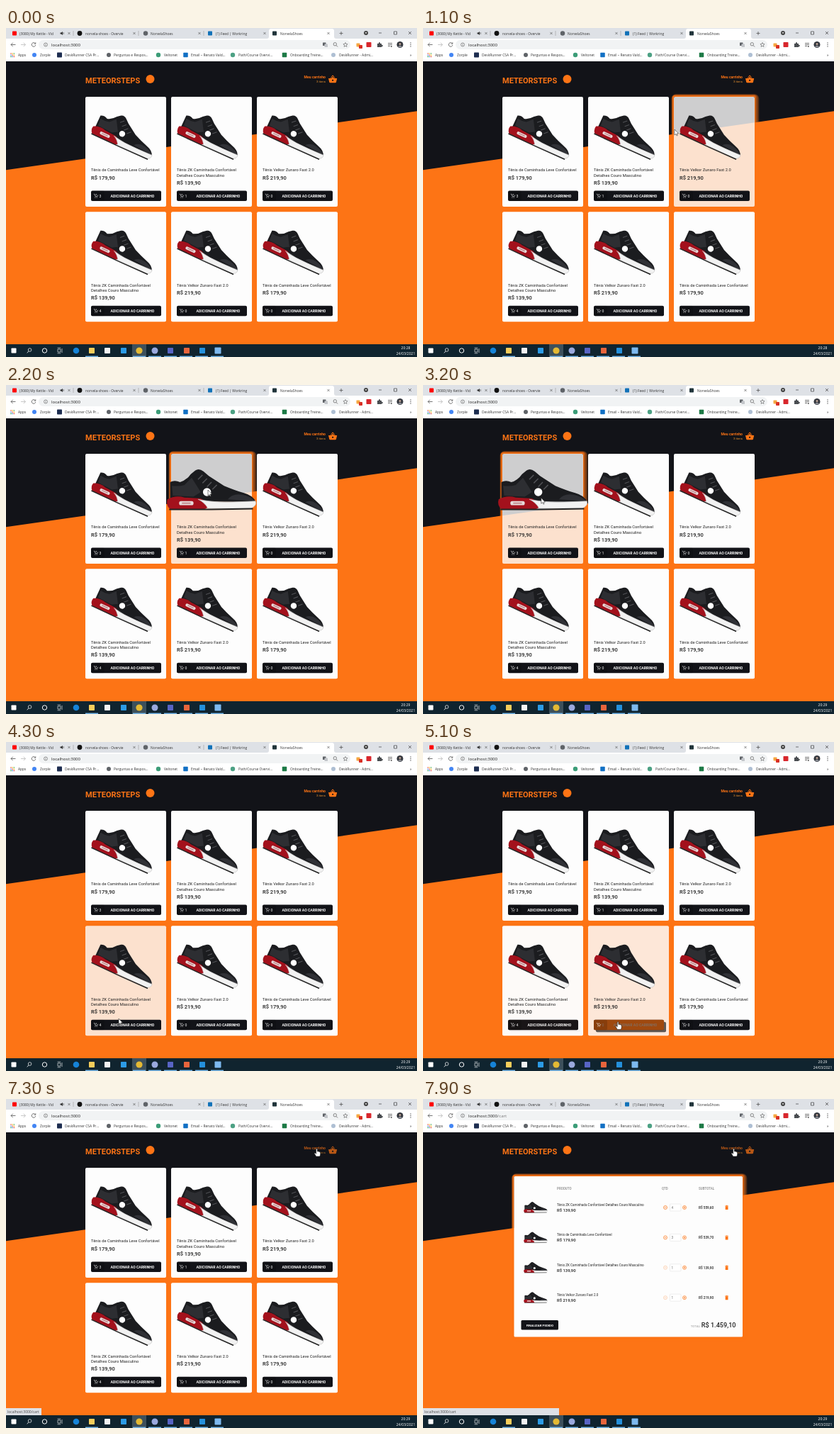
These frames come from a looping animation (580x464 px, 8000 ms). An HTML page:

```html
<!DOCTYPE html>
<html lang="pt-BR">
<head>
<meta charset="utf-8">
<title>NorvelaShoes</title>
<style>
  html, body { margin: 0; width: 100%; height: 100%; overflow: hidden; background: #fd7415; }
  svg { display: block; width: 580px; height: 464px; }
  text { font-family: Roboto, sans-serif; white-space: pre; }
  .ui text { font-family: "Open Sans", "Noto Sans", sans-serif; }
  .b { font-weight: 700; }
  .m { font-weight: 500; }
</style>
</head>
<body>
<svg id="stage" viewBox="0 0 580 464" xmlns="http://www.w3.org/2000/svg"></svg>
<script>
const LOOP = 8000, ADDED = 5500, OPENED = 7600, MINUTE = 1650;
const ORANGE = '#fd7415', INK = '#121318';

// Drawing helpers
const rect = (x, y, w, h, fill, r = 0, more = '') =>
  `<rect x="${x}" y="${y}" width="${w}" height="${h}" rx="${r}" fill="${fill}" ${more}/>`;
const dot = (x, y, r, fill, more = '') => `<circle cx="${x}" cy="${y}" r="${r}" fill="${fill}" ${more}/>`;
const ring = (x, y, r, color, w = .8) => dot(x, y, r, 'none', `stroke="${color}" stroke-width="${w}"`);
const square = (x, y, s, fill) => rect(x - s / 2, y - s / 2, s, s, fill, .8);
const text = (x, y, size, str, fill = '#222', more = '') =>
  `<text x="${x}" y="${y}" font-size="${size}" fill="${fill}" ${more}>${str}</text>`;
const line = (d, color = '#555', w = .8) => `<path d="${d}" fill="none" stroke="${color}" stroke-width="${w}"/>`;
const shape = (d, fill, more = '') => `<path d="${d}" fill="${fill}" ${more}/>`;
const group = (body, more = '') => `<g ${more}>${body}</g>`;
const BOLD = 'class="b"', MEDIUM = 'class="m"', END = 'text-anchor="end"', MID = 'text-anchor="middle"';

// Soft rim, a little wider to the right
const glow = (x, y, w, h, more = '') => group([0, 1, 2, 3, 4].map(i =>
  rect(x - .5 - .6 * i, y - .5 - .7 * i, w + 1 + 1.9 * i, h + 1 + 1.9 * i, 'none', 2 + i,
    `stroke="${ORANGE}" stroke-width="1.4" stroke-opacity="${.9 - i * .17}"`)).join(''), more);

const shoe =
  shape('M-46-9Q-41-12-35-9-28-11-23-18L-18-22Q-14-25-9-21L-3-16 14-5Q26 0 36 3 47 6 49 13L-46 12Z', '#1b1c1f') +
  shape('M-44-5Q-36-4-30-6L-22-14-12 2-20 7-43 6Z', '#2d2e32') +
  shape('M18 10Q24 3 34 5 44 7 48 12Z', '#303136') +
  line('M-10-17l-5 5M-5-13l-5 5M0-9l-5 5M6-6l-5 5', '#505155', 1.2) +
  shape('M-49 10Q-40 5-30 8L-12 9-2 15Q-4 20-8 21H-46Q-51 16-49 10Z', '#a3111c') +
  shape('M-15 10Q5 14 24 13L49 12Q51 17 44 20H-4Q-8 13-15 10Z', '#f2f2f2', 'stroke="#bbb" stroke-width=".5"') +
  rect(-36, 12, 16, 4.5, '#e6dada', 2) + rect(-33, 13.5, 10, 1.4, '#c08084', .7) +
  line('M-47 21.3H0L46 20.5', '#222', 1.6) +
  dot(-5, 2, 4.5, '#fff');

const trolley = (x, y) => line(`M${x - 2.6} ${y - 2.4}h1l1.3 3.3h2.6l1-2`, '#fff', .6) +
  dot(x - .6, y + 2.2, .5, '#fff') + dot(x + 1.7, y + 2.2, .5, '#fff') + line(`M${x + .8} ${y - 2.8}v2M${x - .2} ${y - 1.8}h2`, '#fff', .4);

// Browser window
function browser() {
  const close = (x, y = 7.5) => line(`M${x - 1.6} ${y - 1.6}l3.2 3.2m0-3.2l-3.2 3.2`, '#444', .6);
  const tabs = [
    [12, 19, '(3080) My Kettle - Vid', 89], [104, 112, 'norvela-shoes - Overvie', 181],
    [197, 204, 'NorvelaShoes', 273], [288, 296, '(1) Feed | Workring', 365], [379, 387, 'NorvelaShoes', 455]];
  const marks = [
    [17, 'Apps'], [48, 'Zorple'], [83, 'DeskRunner CSA Pr...'], [152, 'Perguntas e Respos...'], [223, 'Veltonet'],
    [261, 'Email – Renato Vald...'], [328, 'Path/Course Overvi...'], [401, 'Onboarding Treine...'],
    [470, 'DeskRunner - Admi...'], [570, '»']];
  let s = rect(0, 0, 580, 47, '#fff') + rect(0, 0, 580, 15, '#dee1e6') +
    shape('M368 15Q371 15 371 12V4Q371 1 374 1H460Q463 1 463 4V12Q463 15 466 15Z', '#fff');
  for (const [, x, name, end] of tabs) s += text(x, 9.5, 4.9, name, '#333') + close(end);
  s += square(12, 7.5, 6, '#f00') + dot(104, 7.5, 3.4, '#111') + dot(197, 7.5, 3.2, '#5f6368') +
    square(288, 7.5, 6, '#1272b8') + square(379, 7.5, 6, '#20343a') +
    shape('M76.5 6.5h1.5l2-1.6v5.2l-2-1.6h-1.5z', '#333') + line('M81.2 6v3', '#333', .6) +
    line('M95 4v7M187 4v7M279 4v7', '#888', .5) + line('M470.5 7.5h5M473 5v5', '#444', .7);
  s += dot(508, 7, 3, '#444') + shape('M506.5 6.2h3l-1.5 1.9z', '#fff') +
    line('M526 7h4M547.5 5h4v4h-4z', '#222', .6) + line('M568 5l4 4m0-4l-4 4', '#222', .6);
  // Toolbar
  s += rect(46, 17, 440, 13, '#f1f3f4', 6.5) + line('M13.5 23.5H7m2.7-2.7L7 23.5l2.7 2.7') +
    line('M21 23.5h6.5m-2.7-2.7l2.7 2.7-2.7 2.7', '#bbb') +
    line('M41.3 21.8a2.8 2.8 0 1 0 .5 2.2M41.8 20.3v2h-2') + ring(56, 23.5, 2.5, '#555', .6) + line('M56 23v1.8M56 21.8v.6', '#555', .6) +
    `<text x="64" y="25.6" font-size="6.1" fill="#222">localhost:3000<tspan id="path" fill="#777"></tspan></text>`;
  s += rect(447, 20.5, 4.5, 4.5, '#5f6368', .5) + rect(449.5, 22.5, 4.5, 4.5, '#c3c6ca', .5) +
    ring(464.3, 22.8, 2.2, '#555', .7) + line('M466 24.5l2 2') +
    line('M479 20.5l.9 2 2.2.2-1.7 1.5.5 2.2-1.9-1.2-1.9 1.2.5-2.2-1.7-1.5 2.2-.2z', '#555', .6) +
    square(497, 24, 5, '#f5a742') + square(500.5, 26.5, 5, '#d93025') + square(512, 23.5, 7, '#d8262c') +
    shape('M524 22h2a1.2 1.2 0 1 1 2 0h2v2a1.2 1.2 0 1 1 0 2v1h-6z', '#4a4d51') +
    line('M539 21.5h6M539 23.5h6M539 25.5h3', '#555') + dot(543.8, 26, 1, '#555') +
    dot(556, 23.5, 4.5, '#33363d') + dot(556, 22.6, 1.5, '#b9a094') + shape('M553 26.5q3-4 6 0-3 2-6 0z', '#8a8d94') +
    dot(571, 21, .7, '#555') + dot(571, 23.5, .7, '#555') + dot(571, 26, .7, '#555');
  // Bookmarks
  for (const [x, name] of marks) s += text(x, 39.9, 4.9, name, '#333');
  const hues = ['#ea4335', '#fbbc05', '#34a853', '#4285f4'];
  for (let i = 0; i < 9; i++) s += square(7 + i % 3 * 2.2, 36 + (i / 3 | 0) * 2.2, 1.6, hues[i % 4]);
  s += dot(40, 38, 3, '#4285f4') + square(75.5, 38, 7, '#1d2d50') + dot(145, 38, 3, '#5f6368') + dot(215, 38, 3.2, '#3c9d78') +
    square(253.5, 38, 6.5, '#1270c4') + dot(320, 38, 3.2, '#4da184') + square(393, 38, 6.5, '#1d7a46') + dot(462, 38, 3, '#aebfd3');
  return group(s, 'class="ui"');
}

function taskbar() {
  let s = rect(0, 446, 580, 18, '#10242f') + rect(178, 446, 20, 18, '#3d505b');
  for (const x of [121, 188, 210, 232, 254, 276, 298]) s += rect(x - 9, 462.6, 18, 1.4, '#76b9ed');
  s += square(11, 455, 7, '#fff') + ring(33.6, 454, 2.3, '#fff', .7) + line('M32 455.8l-2.3 2.5', '#fff', .8) +
    ring(54.5, 455, 3.2, '#fff', 1) + line('M73 453h4v4h-4zM79 452v6M72.6 451.2h4.6M72.6 458.8h4.6', '#fff', .6) +
    dot(99, 455, 4.3, '#1683d8') + square(121, 455, 8, '#f6cd5b') + square(143, 455, 8, '#f3f3f3') + square(166, 455, 8, '#2c9be6') +
    dot(188, 455, 4.6, '#e4b934') + dot(210, 455, 4.5, '#9aa9de') + square(232, 455, 8, '#5864c4') +
    square(255, 455, 8, '#e8643c') + square(277, 455, 8, '#2490dc') + square(299, 455, 9, '#7db9ef') +
    text(564, 452.8, 5, '', '#fff', MID + ' id="clock"') + text(564, 461, 5, '24/03/2021', '#fff', MID);
  return group(s, 'class="ui"');
}

// Shop page
const WALK = 'Tênis de Caminhada Leve Confortável', ZK = ['Tênis ZK Caminhada Confortável', 'Detalhes Couro Masculino'],
  LITE = 'Tênis Velkor Zunaro Fast 2.0';
const CARD_W = 114, CARD_H = 155;
const cards = [[[WALK], '179,90', 3], [ZK, '139,90', 1], [[LITE], '219,90', 0], [ZK, '139,90', 4], [[LITE], '219,90', 0], [[WALK], '179,90', 0]]
  .map(([names, price, count], i) => ({ names, price, count, x: 112 + i % 3 * 121, y: i < 3 ? 97 : 259.2 }));

function card({ names, price, count, x, y }, i) {
  const by = y + 132.5, two = names.length > 1;
  return group(
    glow(x, y, CARD_W, CARD_H, 'class="glow"') + rect(x, y, CARD_W, CARD_H, '#fdfdfd', 2, 'class="back"') +
    group(shoe, 'class="shoe"') +
    names.map((n, k) => text(x + 8, y + 105.3 + 7.3 * k, 5.76, n)).join('') +
    text(x + 8, y + (two ? 123.7 : 116.8), 7.5, 'R$ ' + price, '#222', MEDIUM) +
    rect(x + 11, by + 3, 99, 14.5, '#0b0b0c', 2, 'class="hot"') + rect(x + 8, by, 99, 14.5, INK, 2) +
    rect(x + 8, by, 99, 14.5, '#ec670c', 2, 'class="hot"') +
    rect(x + 8, by, 19, 14.5, 'rgba(0,0,0,.14)', 2) + trolley(x + 14.5, by + 7.2) +
    text(x + 19.5, by + 9.2, 5.2, count, '#fff', 'class="label count"') +
    text(x + 66.5, by + 9.1, 5.1, 'ADICIONAR AO CARRINHO', '#fff', MID + ' class="b label"'), `id="card${i}"`);
}

function header() {
  return rect(0, 46, 580, 400, ORANGE) + shape('M0 46H580V117.3L0 200.3Z', INK) +
    text(112, 77.7, 11, 'METEORSTEPS', ORANGE, BOLD) + dot(203.5, 72, 6, ORANGE) +
    group(text(451, 71.2, 5.1, 'Meu carrinho', ORANGE, END + ' class="b"') +
      text(451, 77.3, 4.4, '', '#f0952f', END + ' id="items"') +
      shape('M455 71h2.6l3-4.2h1l3 4.2h2.6l-1.3 5.5q-.3.8-1 .8h-7.6q-.7 0-1-.8z', ORANGE) +
      line('M458.8 71l2.3-3 2.3 3', INK, .9) + dot(461.1, 73.8, 1.1, INK), 'id="link"');
}

function cart() {
  const rows = [[ZK.join(' '), '139,90', 4, '559,60'], [WALK, '179,90', 3, '539,70'],
    [ZK.join(' '), '139,90', 1, '139,90'], [LITE, '219,90', 1, '219,90']];
  let s = glow(128.5, 109, 322.5, 226.5) + rect(128.5, 109, 322.5, 226.5, '#fdfdfd', 1.5);
  [[189, 'PRODUTO'], [337, 'QTD'], [389, 'SUBTOTAL']].forEach(([x, n]) => s += text(x, 127.6, 4.5, n, '#999', BOLD));
  rows.forEach(([name, price, n, sum], i) => {
    const y = 153 + i * 42.4, o = ORANGE;
    s += group(shoe, `transform="translate(159 ${y}) scale(.34)"`) + text(189, y - 2.3, 4.64, name) +
      text(189, y + 6, 5.9, 'R$ ' + price, '#222', MEDIUM) +
      group(ring(342, y, 2.5, o, .7) + line(`M340.6 ${y}h2.8`, o, .7), `opacity="${n > 1 ? 1 : .4}"`) +
      rect(348.5, y - 5, 15.5, 10, '#fff', 1, 'stroke="#ddd" stroke-width=".5"') + text(350.5, y + 1.7, 4.6, n, '#666') +
      ring(369, y, 2.5, o, .7) + line(`M367.6 ${y}h2.8M369 ${y - 1.4}v2.8`, o, .7) +
      text(389, y + 1.8, 4.7, 'R$ ' + sum, '#222', MEDIUM) +
      shape(`M426.3 ${y - 2.6}h1.3l.5-.6h1l.5.6h1.3v.8h-4.6zM426.7 ${y - 1.5}h3.8v4.6h-3.8z`, o);
  });
  return s + rect(138.5, 312, 52.5, 13.5, INK, 1.5) + text(164.8, 320.5, 4.4, 'FINALIZAR PEDIDO', '#fff', MID + ' class="b"') +
    text(391, 322, 4.4, 'TOTAL', '#999', END) + text(441.5, 322, 9.1, 'R$ 1.459,10', '#222', END + ' class="m"');
}

const $ = q => document.querySelector(q);
$('#stage').innerHTML = header() + group(cards.map(card).join(''), 'id="shop"') + group(cart(), 'id="cart"') +
  group(rect(0, 436, 50, 10, '#dee1e6', 0, 'id="bar"') + text(2, 443, 5, 'localhost:3000/cart', '#444'), 'id="status" class="ui"') +
  browser() + taskbar() +
  group(shape('M0 0V8L1.9 6.4 3.1 9 4.3 8.4 3.1 6H5.6Z', '#fff', 'stroke="#111" stroke-width=".5"'), 'id="arrow"') +
  group(shape('M-.9 .8Q0-.6 .9 .8V4Q2 3.3 2.5 4.2 3.6 3.7 4 4.7 5.2 4.5 5.2 6V8Q5.2 9 4.3 11H-1Q-1.6 9.2-3.2 7.2-3.7 5.8-2.3 6L-.9 7.2Z',
    '#fff', 'stroke="#111" stroke-width=".6"'), 'id="hand"');

// Motion: hover states follow from the pointer's path
const stops = [[0, 600, 260], [500, 410, 160], [850, 357, 145], [1100, 355, 143], [1600, 300, 150], [2200, 285, 148], [2600, 280, 152],
  [3000, 165, 150], [3350, 168, 165], [3700, 165, 320], [4150, 160, 387], [4300, 159, 390], [4700, 170, 398],
  [5200, 287, 394], [6300, 287, 394], [7150, 438.5, 70], [8000, 438.5, 70]];

function pointer(t) {
  t = Math.max(0, t);
  const i = stops.findIndex((s, k) => k && t <= s[0]);
  const [t0, x0, y0] = stops[i - 1], [t1, x1, y1] = stops[i];
  const u = (t - t0) / (t1 - t0), e = u * u * (3 - 2 * u);
  return [x0 + (x1 - x0) * e, y0 + (y1 - y0) * e];
}
const over = (t, x, y, w, h) => {
  const [px, py] = pointer(t);
  return px >= x && px <= x + w && py >= y && py <= y + h;
};
// Share of the last `span` ms spent over the box
const eased = (t, span, ...box) => {
  let n = 0;
  for (let k = 0; k < 20; k++) n += over(t - k * span / 20, ...box);
  const u = n / 20;
  return u * u * (3 - 2 * u);
};
const show = (q, on) => $(q).style.display = on ? '' : 'none';

function draw(t) {
  const inCart = t >= OPENED, onLink = over(t, 418, 64, 50, 16);
  let clickable = onLink;
  cards.forEach(({ x, y, count }, i) => {
    const find = q => document.querySelectorAll(`#card${i} ${q}`);
    const near = eased(t, 200, x, y, CARD_W, CARD_H), turn = eased(t, 250, x + 8, y + 8, 98, 90);
    const button = [x + 8, y + 132.5, 99, 14.5], hot = eased(t, 200, ...button);
    clickable ||= over(t, ...button);
    find('.glow')[0].setAttribute('opacity', near);
    find('.back')[0].setAttribute('opacity', 1 - .2 * near);
    find('.shoe')[0].setAttribute('transform',
      `translate(${x + 57} ${y + 52.5 - turn}) rotate(${25 * (1 - turn)}) scale(${.94 + .33 * turn})`);
    find('.hot').forEach(e => e.setAttribute('opacity', hot));
    find('.label').forEach(e => e.style.fill = `color-mix(in srgb, #401c05 ${hot * 100}%, #fff)`);
    find('.count')[0].textContent = i === 4 && t >= ADDED ? 1 : count;
  });
  $('#items').textContent = (t < ADDED ? 3 : 4) + ' itens';
  $('#link').setAttribute('opacity', 1 - .3 * eased(t, 150, 418, 64, 50, 16));
  $('#clock').textContent = t < MINUTE ? '20:28' : '20:29';
  $('#path').textContent = inCart ? '/cart' : '';
  $('#bar').setAttribute('width', inCart ? 192 : 50);
  show('#shop', !inCart);
  show('#cart', inCart);
  show('#status', onLink);
  show('#arrow', !clickable);
  show('#hand', clickable);
  const [px, py] = pointer(t);
  $(clickable ? '#hand' : '#arrow').setAttribute('transform', `translate(${px} ${py})`);
}

const start = performance.now();
function frame() {
  draw((performance.now() - start) % LOOP);
  requestAnimationFrame(frame);
}
frame();
</script>
</body>
</html>
```
